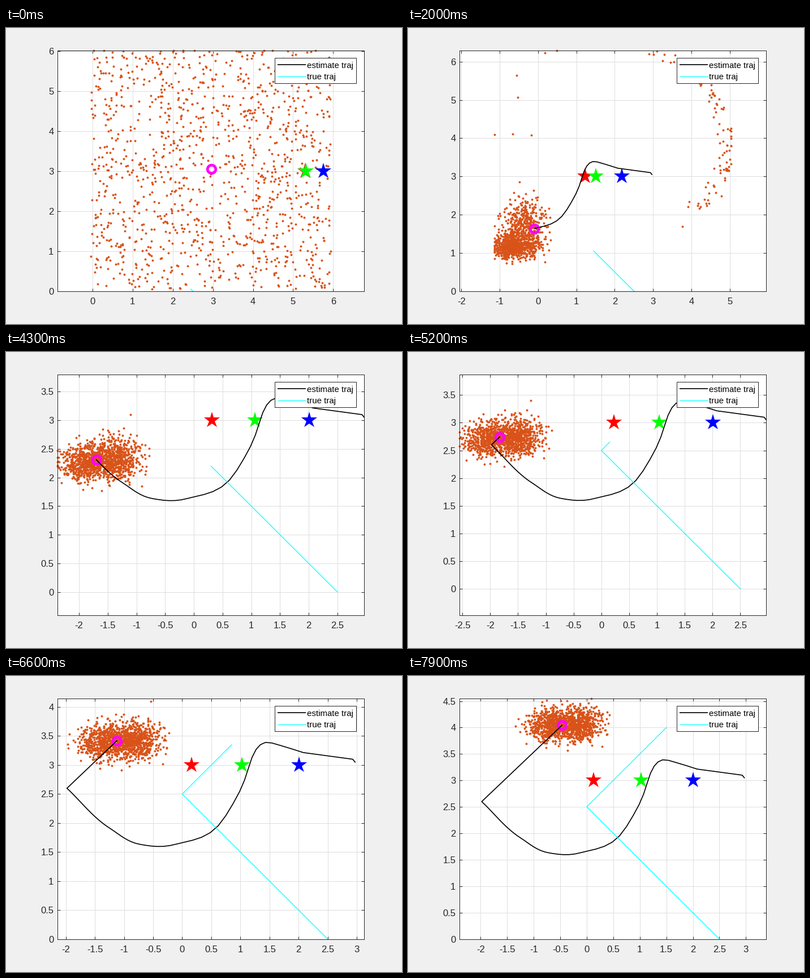
These frames come from a looping animation (700 by 525 pixels, 8000 ms). A matplotlib script:

```python
import numpy as np
import matplotlib.pyplot as plt
from matplotlib.animation import FuncAnimation
from matplotlib.patches import Rectangle

W, H, DPI = 700, 525, 100
FRAMES, INTERVAL = 80, 100
LEFT, RIGHT, TOP, BOTTOM = 91.4, 633.4, 39.6, 466.6
ASPECT = (BOTTOM - TOP) / (RIGHT - LEFT)
N = 1200
INK = "#262626"

plt.rcParams["font.family"] = "Liberation Sans"


def px(n):
    return n * 72 / DPI


def smooth(t, keys, values):
    """Cubic Hermite curve through a few key points."""
    keys, values = np.asarray(keys, float), np.asarray(values, float)
    slope = np.gradient(values, keys)
    k = np.clip(np.searchsorted(keys, t, side="right") - 1, 0, len(keys) - 2)
    h = keys[k + 1] - keys[k]
    s = (t - keys[k]) / h
    return (values[k] * (1 + 2 * s) * (1 - s) ** 2
            + slope[k] * h * s * (1 - s) ** 2
            + values[k + 1] * s * s * (3 - 2 * s)
            + slope[k + 1] * h * s * s * (s - 1))


steps = np.arange(FRAMES)

# True path: a diagonal that turns by 90 degrees after 50 steps
n = np.arange(FRAMES + 1)
true_x, true_y = 0.05 * np.abs(50 - n), 0.05 * n

# Estimated path: two rough steps, a smooth bend, a straight finish
bend = np.array([(2, 2.08, 3.215), (4, 1.68, 3.34), (6, 1.43, 3.39), (8, 1.27, 3.27),
                 (12, 0.985, 2.54), (15, 0.62, 1.955), (20, -0.1, 1.637),
                 (26, -0.71, 1.63), (34, -1.24, 1.908), (49, -1.98, 2.6)]).T


def estimate(axis, first, last):
    curve = smooth(np.arange(2, 50), bend[0], bend[axis])
    return np.r_[first, curve, np.linspace(curve[-1], last, FRAMES - 49)[1:]]


est_x = estimate(1, [2.97, 2.93], -0.468)
est_y = estimate(2, [3.05, 3.10], 4.043)

# Beacon errors shrink along one shared curve: (colour, goal, first error, rate)
beacons = [("red", 0, 5.3, 0.68), ("lime", 1, 4.32, 1), ("blue", 2, 3.76, 1.4)]
decay = smooth(steps, [0, 12, 20, 34, 52, 79], [0, 1.52, 2.15, 3.55, 4.63, 5.45])
star_x = [goal + error * np.exp(-rate * decay) for _, goal, error, rate in beacons]

# Fixed random traits of each particle
rng = np.random.default_rng(7)
start = rng.uniform(0, 6, (N, 2))
gauss = rng.normal(size=(N, 2))
gx, gy = gauss.T
rank = (np.arange(N) + 0.5) / N
late, spread = rng.random((2, N))
reach = 1 + 0.045 * rng.normal(size=N)
survive = np.clip((rank - 0.7) / 0.3, 0, 1)
angle = np.radians(8 + (2 * spread ** 0.85 - 1) * (130 - 85 * survive))


def arc_share(i):
    return 0.5 * np.exp(-(i / 15) ** 2)


def particles(i):
    """Four groups ride along with the true path; resampling shifts their shares."""
    origin = np.array([true_x[i + 1], true_y[i + 1]])
    m = np.exp(-i / 12)

    main = np.c_[-2.2 + (0.22 - 0.1 * m) * gx + 0.45 * (late < 0.2),
                 0.05 + 0.35 * m + 0.15 * gy]
    second = np.c_[-1.65 - 0.9 * m + (0.23 + 0.2 * m) * gx,
                   np.maximum(0.07 + 2.8 * m + (0.16 + 1.1 * m) * gy,
                              -0.5 + 1.2 * m + 0.05 * gx)]
    band = np.c_[-1.9 + 0.9 * spread ** 3 + 0.28 * gx,
                 1.55 + 3.9 * spread ** 0.9 + 0.18 * gy]
    arc = np.c_[0.6 + (2.85 + 0.15 * m) * reach * np.cos(angle),
                2.8 + (2.4 + 0.55 * m) * reach * np.sin(angle)]

    arc_from = 1 - arc_share(i)
    band_from = arc_from - 0.35 * np.exp(-(i / 14) ** 4)
    second_from = 0.57 * (1 - np.exp(-(i / 14) ** 2))
    p = np.select([c[:, None] for c in (late < np.exp(1 - i), rank > arc_from,
                                        rank > band_from, rank > second_from)],
                  [start - [2.5, 0], arc, band, second], main)
    jitter = np.random.default_rng(100 + i).normal(0, 0.025, (N, 2))
    return p + origin + jitter * (i > 0)


def bounds(i):
    """Data extent; it snaps in once the last far particle is gone."""
    x0 = min(true_x[i + 1] - 2.5 - 0.2 * min(i / 50, 1), est_x[:i + 1].min())
    if arc_share(i) * N > 0.5:
        return x0, 5.96 - 0.046 * i, min(6.02 + 0.0375 * i, 6.9 - 0.03 * i)
    j = i - 66
    return x0, est_x[0], max(3.4, 4.15 + min(0.0536 * j, 0.031 * j))


def ticks(lo, hi, step):
    v = np.arange(np.ceil(lo / step - 1e-6), np.floor(hi / step + 1e-6) + 1) * step + 0.0
    return v, [f"{t:g}" for t in v]


fig = plt.figure(figsize=(W / DPI, H / DPI), dpi=DPI, facecolor="#f0f0f0")
ax = fig.add_axes([LEFT / W, 1 - BOTTOM / H, (RIGHT - LEFT) / W, (BOTTOM - TOP) / H])
ax.set_axisbelow(True)
ax.grid(True, color="#dedede", lw=px(1))
ax.tick_params(direction="in", top=True, right=True, length=px(5), width=px(1),
               color=INK, labelcolor=INK, labelsize=px(16.67))
ax.tick_params(axis="x", pad=px(11))
ax.tick_params(axis="y", pad=px(7))
for spine in ax.spines.values():
    spine.set(color=INK, linewidth=px(1))

dots, = ax.plot([], [], "o", color="#d95319", ms=px(3.9), mew=0, clip_on=False, zorder=2)
spot, = ax.plot([], [], "o", mfc="none", mec="magenta", ms=px(14.5), mew=px(4.8), zorder=3)
stars = [ax.plot([], [], "*", color=b[0], ms=px(30), mew=0, zorder=4)[0] for b in beacons]
est_style = dict(color="black", lw=px(1.67))
true_style = dict(color="cyan", lw=px(1.25))
est_line, = ax.plot([], [], zorder=5, **est_style)
true_line, = ax.plot([], [], zorder=5, **true_style)

# Legend on a pixel grid
top = fig.add_axes([0, 0, 1, 1], zorder=5)
top.set(xlim=(0, W), ylim=(H, 0))
top.axis("off")
top.add_patch(Rectangle((475.4, 52.6), 144, 45, fc="white", ec=INK, lw=px(1)))
for y, label, style in [(65, "estimate traj", est_style), (85.6, "true traj", true_style)]:
    top.plot([479.5, 529.5], [y, y], solid_capstyle="butt", **style)
    top.text(532.5, y + 5.8, label, size=px(15), color="black", va="baseline")


def update(i):
    x0, x1, y1 = bounds(i)
    span = max(y1, (x1 - x0) * ASPECT)
    cx, half = (x0 + x1) / 2, span / ASPECT / 2
    xlim = cx - half, cx + half
    ylim = (y1 - span) / 2, (y1 + span) / 2
    step = 0.5 if span < 5 else 1
    ax.set(xlim=xlim, ylim=ylim)
    ax.set_xticks(*ticks(*xlim, step))
    ax.set_yticks(*ticks(*ylim, step))

    x, y = particles(i).T
    dots.set_data(np.clip(x, x0, x1), np.clip(y, 0, y1))
    spot.set_data([est_x[i]], [est_y[i]])
    for star, path in zip(stars, star_x):
        star.set_data([path[i]], [3])
    est_line.set_data(est_x[:i + 1], est_y[:i + 1])
    true_line.set_data(true_x[:i + 2], true_y[:i + 2])
    return dots, spot, *stars, est_line, true_line


anim = FuncAnimation(fig, update, frames=FRAMES, interval=INTERVAL,
                     repeat=True, repeat_delay=0, init_func=lambda: update(0))
plt.show()
```
